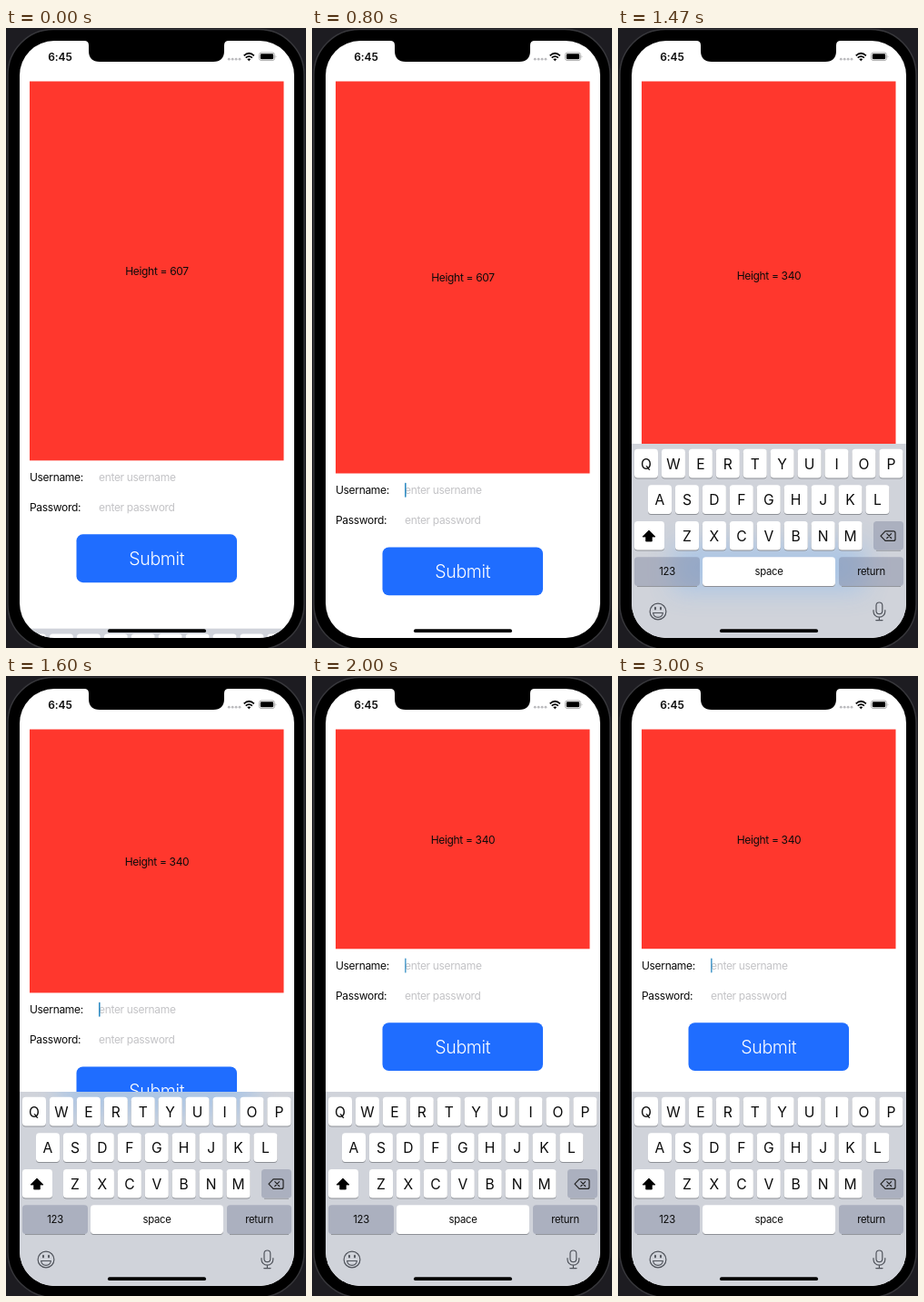
An HTML page for the animation above (3070 ms loop, 330 by 680 pixels).

```html
<!DOCTYPE html>
<html lang="en">
<head>
<meta charset="utf-8">
<title>Login form with keyboard</title>
<style>
  html, body { margin: 0; width: 100%; height: 100%; overflow: hidden; background: #1d1c21; }
  svg { display: block; width: 330px; height: 680px; }
  text { font: 400 12px Inter, Roboto, sans-serif; letter-spacing: -0.33px; fill: #0b0b0b; }
  .mid { text-anchor: middle; }
  .hint { fill: #c3c3c6; }
  .clock { font-weight: 600; letter-spacing: -0.1px; }
  .submit { font-size: 19.5px; font-weight: 300; letter-spacing: -0.35px; fill: #fff; }
  .letter { font-size: 15.6px; letter-spacing: 0; }
  .word { font-size: 11.3px; letter-spacing: -0.25px; }
  .line { fill: none; stroke: #50545c; stroke-width: 1.2; stroke-linecap: round; stroke-linejoin: round; }
</style>
</head>
<body>
<svg viewBox="0 0 330 680" xmlns="http://www.w3.org/2000/svg">
  <defs>
    <clipPath id="screen"><rect x="15" y="14" width="302" height="655" rx="38"/></clipPath>
    <clipPath id="board"><rect x="15" y="456" width="302" height="224"/></clipPath>
    <filter id="blur" x="-40%" y="-120%" width="180%" height="340%">
      <feGaussianBlur stdDeviation="14"/>
    </filter>
  </defs>

  <rect width="330" height="680" fill="#1d1c21"/>
  <rect x="2" y="1.5" width="326" height="680" rx="50" fill="#000" stroke="#38383c" stroke-width="1.4"/>

  <g clip-path="url(#screen)">
    <rect x="15" y="14" width="302" height="655" fill="#fff"/>
    <rect id="red" x="26" y="58.5" width="279.5" height="430" fill="#ff372d"/>
    <text id="size" class="mid" x="166"></text>

    <g id="form">
      <text x="26" y="22.5">Username:</text>
      <text x="102" y="22.5" class="hint">enter username</text>
      <text x="26" y="55.8">Password:</text>
      <text x="102" y="55.8" class="hint">enter password</text>
      <rect id="caret" x="102" y="10.3" width="1.6" height="16" rx=".7" fill="#318dc4"/>
      <rect x="77.5" y="81" width="176.5" height="52.8" rx="7" fill="#1f6dff"/>
      <text x="165.7" y="114.5" class="submit mid">Submit</text>
    </g>

    <g id="keyboard">
      <rect x="15" y="456" width="302" height="224" fill="#d0d3da"/>
      <g clip-path="url(#board)">
        <rect id="glow" x="60" width="212" height="52.8" fill="#5aa9ff" opacity=".3" filter="url(#blur)"/>
      </g>
      <g id="keys"></g>
      <path d="M34 551 L41 558 H37.3 V563 H30.7 V558 H27 Z" fill="#000" stroke="#000" stroke-width=".8" stroke-linejoin="round"/>
      <g class="line" style="stroke:#222">
        <path d="M294 551.8 H303 Q305 551.8 305 553.8 V560.4 Q305 562.4 303 562.4 H294 L289 557.1 Z"/>
        <path d="M295.8 554.7 L300.6 559.5 M300.6 554.7 L295.8 559.5"/>
      </g>
      <g class="line">
        <circle cx="44" cy="640" r="8.9"/>
        <path d="M38.6 641.5 H49.4 Q48.6 646.3 44 646.3 Q39.4 646.3 38.6 641.5 Z"/>
        <path d="M41 635.8 V637.4 M47 635.8 V637.4" stroke-width="1.9"/>
        <rect x="284" y="630" width="6.8" height="12.6" rx="3.4"/>
        <path d="M281 638.5 V640 A6.4 6.2 0 0 0 293.8 640 V638.5 M287.4 646.2 V649.6 M283.8 649.6 H291"/>
      </g>
    </g>

    <path d="M86 13 V14 Q91 14 91 19 V25 Q91 37 103 37 H228 Q240 37 240 25 V19 Q240 14 245 14 V13 Z" fill="#000"/>
    <text x="59.5" y="36" class="clock mid">6:45</text>
    <g fill="#bcbcbf">
      <circle cx="245.3" cy="34.2" r="1.4"/><circle cx="249.2" cy="34.2" r="1.4"/>
      <circle cx="253.1" cy="34.2" r="1.4"/><circle cx="257" cy="34.2" r="1.4"/>
    </g>
    <g fill="none" stroke="#000" stroke-width="1.7">
      <path d="M261.7 30.3 Q267.3 25.2 272.9 30.3"/>
      <path d="M263.7 32.6 Q267.3 29.5 270.9 32.6"/>
      <path d="M267.3 35.9 L265.6 34.3 Q267.3 33 269 34.3 Z" fill="#000" stroke-width=".5"/>
    </g>
    <rect x="278.5" y="27" width="17" height="8.6" rx="2.5" fill="none" stroke="#9a9a9a" stroke-width=".8"/>
    <rect x="279.8" y="28.3" width="14.4" height="6" rx="1.4" fill="#000"/>
    <path d="M296.7 29.9 Q298.2 31.3 296.7 32.7 Z" fill="#9a9a9a"/>
    <rect x="112" y="659.3" width="108" height="3.7" rx="1.85" fill="#000"/>
  </g>
</svg>

<script>
const LOOP = 3070, STEP = 200 / 3;
const TOP = 58.5, TALL = 488.5, SHORT = 299.2;
const HIDE_AT = -233, SHOW_AT = 1454, SWITCH = 1465;
const KEYBOARD_TRAVEL = 219;

// time, caret opacity; each value holds until the next
const CARET = [
  [0, 0], [800, 1], [870, .75], [930, .4], [1000, 0],
  [1200, .3], [1270, .75], [1330, 1],
  [2000, .8], [2070, .4], [2130, 0],
  [2330, .3], [2400, .75], [2470, 1], [3000, .85]
];

const $ = id => document.getElementById(id);

function add(name, attrs, text = '') {
  const el = document.createElementNS('http://www.w3.org/2000/svg', name);
  for (const key in attrs) el.setAttribute(key, attrs[key]);
  el.textContent = text;
  $('keys').append(el);
}

function addKey(x, y, width, label, { grey = false, type = 'letter' } = {}) {
  const box = { x, width, height: 31.6, rx: 3.6 };
  if (!grey) add('rect', { ...box, y: y + 1, fill: '#8d9096' });
  else add('path', {
    d: `M${x + 3} ${y + 32.2} H${x + width - 3}`, stroke: '#8d9096', 'stroke-width': .9
  });
  add('rect', { ...box, y, fill: grey ? '#6f7894' : '#fff', 'fill-opacity': grey ? .38 : 1 });
  const base = y + (type === 'letter' ? 21.7 : 19.2);
  add('text', { x: x + width / 2, y: base, class: `${type} mid` }, label);
}

[['QWERTYUIOP', 18, 461.8], ['ASDFGHJKL', 33, 501.3], ['ZXCVBNM', 63, 541]].forEach(([row, x, y]) =>
  [...row].forEach((letter, i) => addKey(x + i * 29.93, y, 26, letter)));
addKey(18, 541, 33, '');
addKey(281, 541, 33, '', { grey: true });
addKey(18, 580.3, 72, '123', { grey: true, type: 'word' });
addKey(93, 580.3, 146, 'space', { type: 'word' });
addKey(243, 580.3, 71, 'return', { grey: true, type: 'word' });

// remaining distance of a critically damped spring
function spring(ms) {
  const x = Math.max(0, ms) / 1000 * Math.sqrt(1000 / 3);
  return (1 + x) * Math.exp(-x);
}

function draw(time) {
  const frame = Math.min(45, Math.floor((time + 3.4) / STEP));
  const t = frame * STEP;
  const open = t >= SWITCH;
  const range = TALL - SHORT;
  const bottom = open
    ? SHORT + range * spring(t - SHOW_AT)
    : TALL - range * spring(t - HIDE_AT);
  const drop = open ? 0 : KEYBOARD_TRAVEL * (1 - spring(t - HIDE_AT));

  $('red').setAttribute('height', bottom - TOP);
  $('size').setAttribute('y', (TOP + bottom) / 2 + 4.7);
  $('size').textContent = 'Height = ' + (open ? 340 : 607);
  $('form').setAttribute('transform', `translate(0 ${bottom})`);
  $('keyboard').setAttribute('transform', `translate(0 ${drop})`);
  $('glow').setAttribute('y', bottom + 81);
  $('glow').style.display = open && bottom > 330 ? '' : 'none';
  $('caret').setAttribute('opacity', CARET.filter(([at]) => at <= t + 5).pop()[1]);
}

const start = performance.now();
function tick() {
  draw((performance.now() - start) % LOOP);
  requestAnimationFrame(tick);
}
tick();
</script>
</body>
</html>
```
